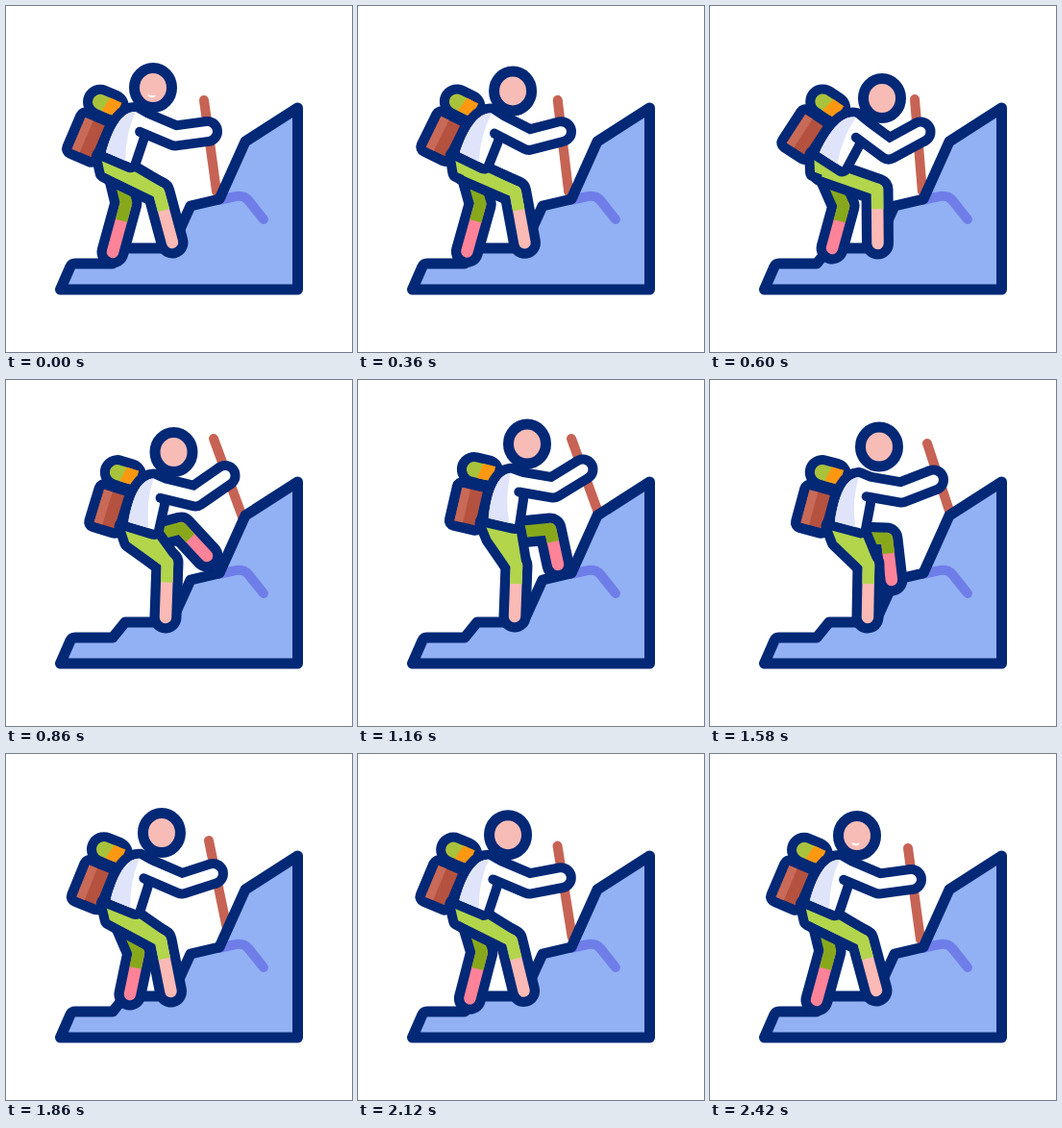
These frames come from a looping animation (360x360 px, 2.76 s). An HTML page:

```html
<!DOCTYPE html>
<html lang="en">
<head>
<meta charset="utf-8">
<title>Hiker</title>
<style>
html, body { margin: 0; width: 100%; height: 100%; overflow: hidden; background: #fff; }
svg { display: block; width: 100vw; height: 100vh; }
</style>
</head>
<body>
<svg id="stage" viewBox="0 0 360 360" fill="none" stroke-linejoin="round"></svg>
<script>
const LOOP = 2760;
const NAVY = '#022876';
const stage = document.getElementById('stage');

// Key times, and the pose held at each of them
const TIMES = [220, 600, 860, 1160, 1300, 1580, 1860, 2420];
const ORDER = [0, 1, 2, 3, 3, 4, 5, 0];
const POSES = {
  headX: [153, 179, 174.5, 176, 176, 162],
  headY: [85, 96, 75, 66.5, 69.5, 82],
  waistX: [117, 125.5, 141, 150, 144, 122],
  waistY: [160, 162, 154, 149, 153, 159],
  lean: [23, 33, 17, 13, 15, 22],
  elbowX: [176, 186, 197, 203, 199, 183],
  elbowY: [135, 149, 121, 112, 117, 135],
  handX: [209.5, 219, 228, 234, 232.5, 215.5],
  handY: [130.5, 131, 99.5, 93, 104, 124.5],
  kneeX: [159, 174, 168, 165, 165, 161],
  kneeY: [194, 191, 190, 193, 192, 194],
  footX: [173, 174.5, 166, 163, 164, 171.5],
  footY: [246, 247, 247, 246, 247, 247],
  backKneeX: [125, 139, 182, 200, 184, 138],
  backKneeY: [205, 208, 154, 155, 165, 207],
  backFootX: [111, 127, 209, 208, 189, 129],
  backFootY: [256, 252, 183, 192, 208, 250],
  stickX: [206, 213, 216, 222, 226, 211],
  stickY: [98, 97, 61, 61, 66, 90],
  tilt: [7.8, 4.7, 20.2, 20, 18.2, 11.7]
};

function add(tag, attrs, parent = stage) {
  const el = document.createElementNS('http://www.w3.org/2000/svg', tag);
  for (const k in attrs) el.setAttribute(k, attrs[k]);
  return parent.appendChild(el);
}
const line = (color, width, cap = 'round', parent = stage) =>
  add('path', { stroke: color, 'stroke-width': width, 'stroke-linecap': cap }, parent);
const area = color => add('path', { fill: color });
const draw = (el, d) => el.setAttribute('d', d);
const poly = (...pts) => 'M' + pts.map(p => p[0].toFixed(2) + ' ' + p[1].toFixed(2)).join('L');
const mix = (a, b, k) => [a[0] + (b[0] - a[0]) * k, a[1] + (b[1] - a[1]) * k];

// Unit normal to a->b, turned towards screen down/left
function normal(a, b) {
  const dx = b[0] - a[0], dy = b[1] - a[1], n = Math.hypot(dx, dy) || 1;
  return [-dy / n, dx / n];
}
const shift = (p, n, k) => [p[0] + n[0] * k, p[1] + n[1] * k];

// Monotone cubic through the key values, at rest at both ends
function slope(v, i) {
  if (i === 0 || i === v.length - 1) return 0;
  const h0 = TIMES[i] - TIMES[i - 1], h1 = TIMES[i + 1] - TIMES[i];
  const a = (v[i] - v[i - 1]) / h0, b = (v[i + 1] - v[i]) / h1;
  if (a * b <= 0) return 0;
  return 3 * (h0 + h1) / ((2 * h1 + h0) / a + (h1 + 2 * h0) / b);
}
function sample(list, t) {
  const v = ORDER.map(i => list[i]);
  if (t <= TIMES[0] || t >= TIMES[TIMES.length - 1]) return v[0];
  let i = 0;
  while (t >= TIMES[i + 1]) i++;
  const h = TIMES[i + 1] - TIMES[i], u = (t - TIMES[i]) / h;
  const u2 = u * u, u3 = u2 * u;
  return v[i] * (2 * u3 - 3 * u2 + 1) + v[i + 1] * (3 * u2 - 2 * u3)
    + h * (slope(v, i) * (u3 - 2 * u2 + u) + slope(v, i + 1) * (u3 - u2));
}

// Stick and mountain
const stick = line('#c66354', 10);
const rock = 'M56.5 295L67 271Q68.5 268 72 268H111L124 252H172L192 208L222 201L249 141L303.5 106V295Z';
add('path', { d: rock, fill: '#92b1f4' });
add('path', { d: 'M221 202L237 198.5Q247 196 252 202L268 222', stroke: '#6f7de9',
  'stroke-width': 10, 'stroke-linecap': 'round' });
add('path', { d: rock, stroke: NAVY, 'stroke-width': 11 });

// A leg is one bent line: rim, then skin, then trousers down to mid-shin
function makeLeg(green, pink) {
  return { rim: line(NAVY, 33), skin: line(pink, 12.5), cloth: line(green, 12.5, 'butt') };
}
function drawLeg(leg, hip, knee, foot) {
  draw(leg.rim, poly(hip, knee, foot));
  draw(leg.skin, poly(knee, foot));
  draw(leg.cloth, poly(hip, knee, mix(knee, foot, 0.36)));
}

const backLeg = makeLeg('#88a81c', '#ff8398');

// Backpack with bedroll
const pack = add('g', {});
const bag = { x: -49, y: -27, width: 22, height: 35.5, fill: '#b4523f' };
add('rect', { ...bag, stroke: NAVY, 'stroke-width': 21 }, pack);
add('rect', bag, pack);
add('rect', { ...bag, width: 9, fill: '#c86a57' }, pack);
draw(line(NAVY, 36, 'round', pack), 'M-41 -48H-28');
draw(line('#a9c23c', 16, 'round', pack), 'M-41 -48H-28');
add('path', { d: 'M-33 -56H-20V-40H-36Z', fill: '#ff9811' }, pack);

// Front leg with a fuller hip
const hipRim = line(NAVY, 20);
const leg = makeLeg('#b2d54c', '#fbbab5');
const hipFill = area('#b2d54c');

// Shirt, arm and head
const shirtRim = line(NAVY, 20);
const shirt = area('#fff');
const shade = area('#dfe4fa');
const armRim = line(NAVY, 31, 'butt');
const handRim = add('circle', { r: 15.5, fill: NAVY });
const armpit = add('circle', { r: 5, fill: NAVY });
const arm = line('#fff', 11);
const head = add('g', {});
add('ellipse', { rx: 19.5, ry: 20.5, fill: '#f8bcb6', stroke: NAVY, 'stroke-width': 11 }, head);
const smile = add('path', { d: 'M-6 7Q-1 9 3 7.5Q1 11 -2 10.5Q-5 10 -6 7Z', fill: '#fff' }, head);

function render(t) {
  const p = {};
  for (const k in POSES) p[k] = sample(POSES[k], t);
  const at = k => [p[k + 'X'], p[k + 'Y']];
  const a = p.lean * Math.PI / 180, c = Math.cos(a), s = Math.sin(a);
  const body = (x, y) => [p.waistX + c * x - s * y, p.waistY + s * x + c * y];
  const pt = (x, y) => body(x, y).map(v => v.toFixed(2)).join(' ');

  const top = at('stick'), tilt = p.tilt * Math.PI / 180;
  draw(stick, poly(top, [top[0] + 96 * Math.sin(tilt), top[1] + 96 * Math.cos(tilt)]));

  drawLeg(backLeg, body(4, 10), at('backKnee'), at('backFoot'));

  pack.setAttribute('transform', `translate(${p.waistX} ${p.waistY}) rotate(${p.lean})`);

  const knee = at('knee'), hip = body(-1, 12), n1 = normal(hip, knee);
  const hipShape = poly(body(-18, 4), body(16, 4), shift(knee, n1, -6),
    shift(knee, n1, 6), body(-8, 18)) + 'Z';
  draw(hipRim, hipShape);
  drawLeg(leg, hip, knee, at('foot'));
  draw(hipFill, hipShape);

  const shoulder = body(9, -46), elbow = at('elbow'), hand = at('hand');
  const n = normal(shoulder, elbow);
  const flank = `M${pt(-15, -2)}C${pt(-18, -25)} ${pt(-17, -48)} ${pt(-3, -53)}`;
  const shirtShape = flank + poly(shift(shoulder, n, -5.5), shift(shoulder, n, 5.5),
    body(11, -28), body(13, -2)).replace('M', 'L') + 'Z';
  draw(shirtRim, shirtShape);
  draw(shirt, shirtShape);
  draw(shade, flank + `Q${pt(-4, -28)} ${pt(7, -2)}Z`);

  draw(armRim, poly(shoulder, elbow, hand));
  draw(arm, poly(shoulder, elbow, hand));
  const place = (el, q) => { el.setAttribute('cx', q[0]); el.setAttribute('cy', q[1]); };
  place(handRim, hand);
  place(armpit, shift(shoulder, n, 10.5));

  head.setAttribute('transform', `translate(${p.headX} ${p.headY})`);
  smile.setAttribute('opacity', t < 220 || t >= 2420 ? 1 : 0);
}

function tick() {
  render(performance.now() % LOOP);
  requestAnimationFrame(tick);
}
tick();
</script>
</body>
</html>
```
